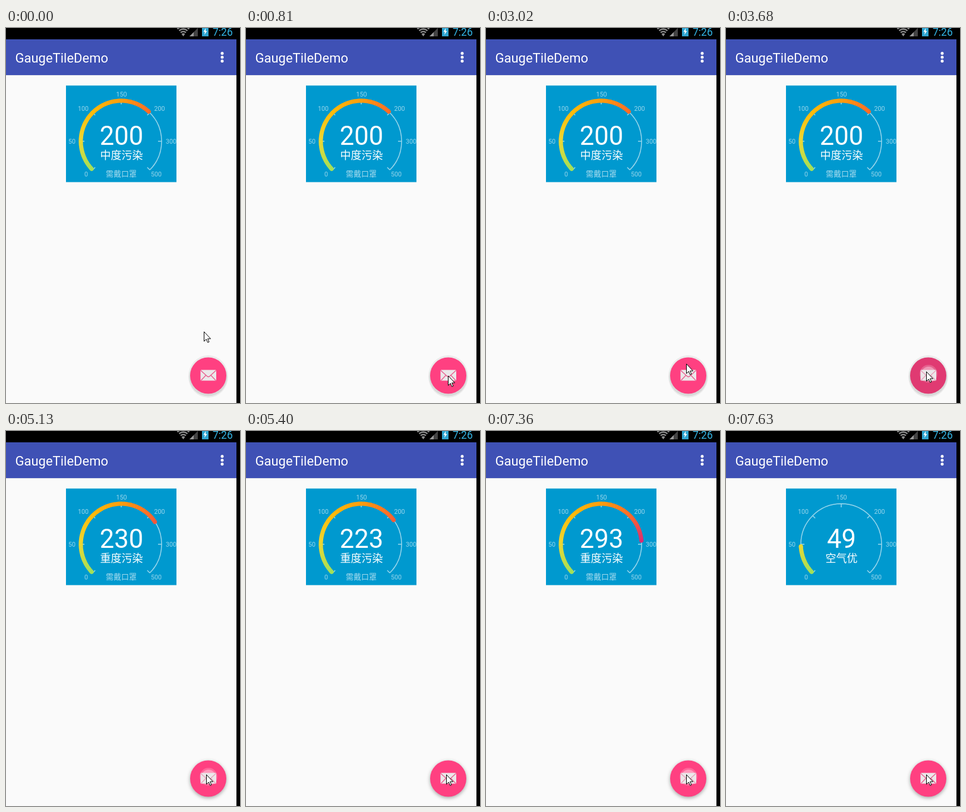
An HTML page for the animation above (8 s loop, 394 by 629 pixels).

```html
<!DOCTYPE html>
<html lang="zh">
<head>
<meta charset="utf-8">
<title>GaugeTileDemo</title>
<style>
html, body { margin: 0; width: 100%; height: 100%; overflow: hidden; background: #000; }
svg { display: block; font-family: Roboto, "Noto Sans CJK SC", "Noto Sans CJK", sans-serif; }
.mid { text-anchor: middle; }
.soft { filter: drop-shadow(0 2px 3px rgba(0, 0, 0, .35)); }
</style>
</head>
<body>
<svg width="394" height="629" viewBox="0 0 394 629">
  <rect width="394" height="629"/>
  <rect y="19" width="388" height="610" fill="#fafafa"/>

  <!-- status bar -->
  <g fill="none" stroke="#8c8c8c" stroke-width="2.3">
    <path d="M288.5 1.5Q298.500 -6 308.500 1.500M291.500 4.500Q298.500 -1 305.500 4.500M294 7.700Q298.500 4 303 7.700"/>
    <path d="M298.500 14L295.500 10Q298.500 7.500 301.500 10Z" fill="#8c8c8c" stroke="none"/>
  </g>
  <path d="M309 14L323 0V14Z" fill="#444"/>
  <path d="M309 14L316 7V14Z" fill="#999"/>
  <rect x="330" y="-3" width="11" height="17" fill="#2fa5d1"/>
  <path d="M336.500 0L332.500 6.500H335L334 11.500L338.500 5H336Z" fill="#fff"/>
  <text x="348" y="12.500" font-size="17.500" fill="#33b5e5">7:26</text>

  <!-- app bar -->
  <rect y="19" width="388" height="60" fill="#3f51b5"/>
  <rect y="79" width="388" height="1" fill="#e4e4ea"/>
  <text x="15.500" y="58" font-size="22" fill="#fff">GaugeTileDemo</text>
  <g fill="#fff">
    <circle cx="364" cy="42.500" r="2.500"/><circle cx="364" cy="49" r="2.500"/><circle cx="364" cy="55.500" r="2.500"/>
  </g>

  <!-- gauge -->
  <rect x="101" y="96.500" width="186" height="162" fill="#0099cf"/>
  <g id="scale" class="mid" font-size="10.700" fill="#fff" fill-opacity=".6" stroke-width="1.500"></g>
  <g id="arc" fill="none" stroke-width="7"></g>
  <g class="mid" fill="#fff">
    <text id="value" x="194.500" y="195.500" font-size="43.500"></text>
    <text id="level" x="194.500" y="220" font-size="18"></text>
    <text id="advice" x="194" y="248.500" font-size="13" fill-opacity=".65">需戴口罩</text>
  </g>

  <!-- floating button -->
  <g id="halo">
    <ellipse cx="340.500" cy="584.500" rx="33.500" ry="35.500" fill="#ebebeb"/>
    <circle cx="340.500" cy="585.500" r="32" fill="#d9d9d9"/>
  </g>
  <circle id="fab" cx="340.500" cy="583" r="30.500"/>
  <g id="ripple" fill="#fff">
    <circle cx="341" cy="580" r="15" opacity=".2"/><circle cx="341" cy="580" r="12" opacity=".35"/>
  </g>
  <rect x="327.500" y="573.500" width="26.500" height="18" rx="1.500" fill="#ebe8ea"/>
  <path id="folds" d="M328 574.500L338.500 584Q340.800 586 343 584L353.500 574.500M328.500 591L336.500 582.500M353 591L345 582.500" fill="none" stroke-width="1.400"/>

  <path id="cursor" d="M.5 .5V16.500L4.200 13L6.700 18.500L9 17.500L6.600 12.200H11.500Z" fill="#fff" stroke="#000"/>
</svg>
<script>
const $ = id => document.getElementById(id);
const CX = 194, CY = 190, R = 68, LOOP = 8000;

// Each track is a list of [time, ...state]; a state holds until the next one.
const cursorTrack = [
  [0, 333, 509], [120, 327, 492], [270, 324, 481], [420, 322, 508], [540, 321, 540],
  [660, 321, 564], [810, 340, 583], [960, 345, 580], [1110, 347, 570], [1230, 343, 555],
  [1360, 339, 543], [1940, 338, 539], [2060, 339, 536], [2620, 339, 535], [2890, 337, 550],
  [3020, 337, 563], [3160, 337, 571], [3280, 337, 576]
];
const valueTrack = [[0, 200], [3830, 230], [5250, 223], [6780, 293], [7480, 49]];
const IDLE = 0, TOUCH = 1, PRESSED = 2;
const pressTrack = [
  [0, IDLE], [3530, TOUCH], [3680, PRESSED], [3830, IDLE],
  [5130, TOUCH], [5250, PRESSED], [5400, IDLE],
  [6520, TOUCH], [6660, PRESSED], [6780, IDLE],
  [7360, TOUCH], [7480, PRESSED], [7630, IDLE]
];
const at = (track, t) => track.findLast(step => step[0] <= t).slice(1);

// Scale marks sit 45 degrees apart, starting at 135.
const marks = [0, 50, 100, 150, 200, 300, 500];
const labelSpots = [[135, 245], [111, 190], [130, 135], [194.5, 111], [258.5, 135], [278, 190], [253, 245]];
const colors = [[160, 224, 90], [238, 216, 48], [255, 186, 8], [255, 156, 12], [255, 104, 40], [212, 36, 126], [150, 30, 140]];

const point = (deg, r = R) => {
  const a = deg * Math.PI / 180;
  return `${(CX + r * Math.cos(a)).toFixed(2)} ${(CY + r * Math.sin(a)).toFixed(2)}`;
};
const arcPath = (from, to) => `M${point(from)}A${R} ${R} 0 ${+(to - from > 180)} 1 ${point(to)}`;

function angleOf(value) {
  const i = marks.findLastIndex(m => m <= value);
  const next = marks[i + 1] ?? marks[i] + 1;
  return 135 + 45 * (i + (value - marks[i]) / (next - marks[i]));
}

function colorAt(deg) {
  const p = (deg - 135) / 45, i = Math.min(5, Math.floor(p));
  return `rgb(${colors[i].map((c, k) => Math.round(c + (colors[i + 1][k] - c) * (p - i)))})`;
}

function levelOf(value) {
  const names = ['空气优', '空气良', '轻度污染', '中度污染', '重度污染'];
  return names[[50, 100, 150, 200].filter(limit => value > limit).length];
}

function drawScale() {
  const ticks = marks.map((m, i) => `M${point(135 + 45 * i)}L${point(135 + 45 * i, R - 6)}`).join('');
  const labels = marks.map((m, i) => `<text x="${labelSpots[i][0]}" y="${labelSpots[i][1] + 4}">${m}</text>`).join('');
  $('scale').innerHTML = `<path d="${arcPath(135, 405)}${ticks}" fill="none" stroke="#fff" stroke-opacity=".6"/>${labels}`;
}

let shown;
function drawValue(value) {
  if (value === shown) return;
  shown = value;
  const start = 137, end = angleOf(value) - 2;
  const piece = (from, to, cap) =>
    `<path d="${arcPath(from, to)}" stroke="${colorAt(from)}" stroke-linecap="${cap}"/>`;
  let html = piece(start, start + .1, 'round') + piece(end - .1, end, 'round');
  for (let a = start; a < end; a += 2) html += piece(a, Math.min(a + 2.4, end), 'butt');
  $('arc').innerHTML = html;
  $('value').textContent = value;
  $('level').textContent = levelOf(value);
  $('advice').style.display = value > 100 ? '' : 'none';
}

function draw(t) {
  const [x, y] = at(cursorTrack, t);
  const [press] = at(pressTrack, t);
  const lifted = t >= 3830;
  drawValue(at(valueTrack, t)[0]);
  $('cursor').setAttribute('transform', `translate(${x} ${y})`);
  $('fab').setAttribute('fill', press === PRESSED ? '#e03a72' : '#ff4081');
  $('fab').setAttribute('class', lifted ? 'soft' : '');
  $('halo').style.display = lifted ? 'none' : '';
  $('ripple').style.display = press ? '' : 'none';
  $('folds').setAttribute('stroke', press ? '#e9a3bb' : '#e8608f');
}

drawScale();
const begin = performance.now();
(function tick() {
  draw((performance.now() - begin) % LOOP);
  requestAnimationFrame(tick);
})();
</script>
</body>
</html>
```
